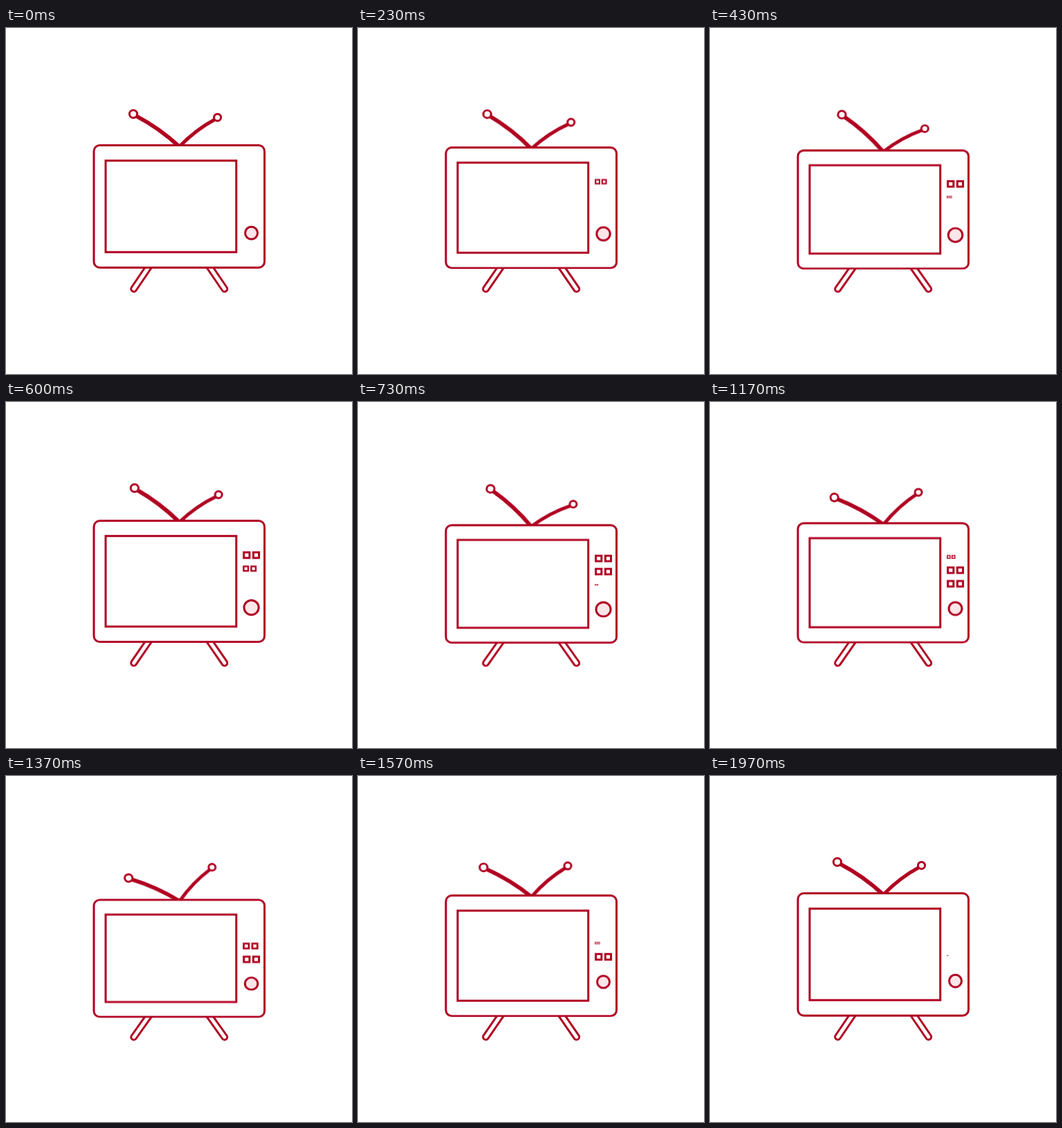
Recreate the animation shown at these times as an HTML page without scripts. Size 500 px wide and 500 px high, loop 2 s.

```html
<!DOCTYPE html>
<html lang="en">
<head>
<meta charset="utf-8">
<title>Television</title>
<style>
html, body { margin: 0; width: 100%; height: 100%; overflow: hidden; background: #fff; }
svg { display: block; width: 100vw; height: 100vh; }

.line { fill: #fff; stroke: #b00020; stroke-width: 3; }
.rod { fill: none; stroke: #b00020; }
.leg { stroke: #b00020; stroke-width: 11; stroke-linecap: round; }
.leg.in { stroke: #fff; stroke-width: 5; }

.tv, .antenna, .row, .knob { animation: 2s -4ms infinite; }
.tv { transform-origin: 250px 383px; animation-name: squash; }
.antenna { transform-origin: 250px 169.5px; animation-name: lean; }
.knob { fill: #fbe6ea; r: 9px; animation-name: swell; }
.row { animation-name: pop; }
.r1 { transform-origin: 342.2px 219.6px; }
.r2 { transform-origin: 342.2px 239.3px; animation-delay: -1670.7ms; }
.r3 { transform-origin: 342.2px 259.4px; animation-delay: -1337.3ms; }

/* six beats of ten ticks: a quick squash, then a linear recovery */
@keyframes squash {
  0%, 100% { transform: scaleY(1); animation-timing-function: step-end; }
  1.6667%, 18.3333%, 35%, 51.6667%, 68.3333%, 85% {
    transform: scaleY(.9555); animation-timing-function: steps(8);
  }
  15%, 31.6667%, 48.3333%, 81.6667% {
    transform: scaleY(.9948); animation-timing-function: step-end;
  }
  65% { transform: scaleY(.992); animation-timing-function: step-end; }
  16.6667%, 33.3333%, 50%, 66.6667%, 83.3333% {
    transform: scaleY(.9766); animation-timing-function: step-end;
  }
  98.3333% { transform: scaleY(1); animation-timing-function: step-end; }
}

/* right while rows arrive, left while they go */
@keyframes lean {
  0%, 50%, 98.3333%, 100% { transform: rotate(0deg); animation-timing-function: step-end; }
  1.6667%, 18.3333%, 35% { transform: rotate(9.7deg); animation-timing-function: steps(8); }
  15%, 31.6667%, 48.3333% { transform: rotate(1.2deg); animation-timing-function: step-end; }
  16.6667%, 33.3333% { transform: rotate(5.2deg); animation-timing-function: step-end; }
  51.6667%, 68.3333%, 85% { transform: rotate(-10deg); animation-timing-function: steps(8); }
  65% { transform: rotate(-1.8deg); animation-timing-function: step-end; }
  81.6667% { transform: rotate(-1.2deg); animation-timing-function: step-end; }
  66.6667%, 83.3333% { transform: rotate(-5.2deg); animation-timing-function: step-end; }
}

@keyframes pop {
  0% { transform: scale(0); animation-timing-function: steps(10); }
  16.6667% { transform: scale(1); }
  50% { transform: scale(1); animation-timing-function: steps(10); }
  66.6667%, 100% { transform: scale(0); }
}

@keyframes swell {
  0%, 78%, 100% { r: 9px; animation-timing-function: linear; }
  21.6667% { r: 10.3px; animation-timing-function: linear; }
  34% { r: 10.7px; animation-timing-function: linear; }
  48.3333% { r: 10.1px; animation-timing-function: linear; }
  58.3333% { r: 9.5px; animation-timing-function: linear; }
}
</style>
</head>
<body>
<svg viewBox="0 0 500 500">
  <defs>
    <g id="pair" class="line">
      <rect x="343.7" y="-4.1" width="8.2" height="8.2"/>
      <rect x="357.4" y="-4.1" width="8.2" height="8.2"/>
    </g>
  </defs>
  <g class="tv">
    <path class="leg" d="M209.8 340L184.7 377M290.6 340L315.8 377"/>
    <path class="leg in" d="M209.8 340L184.7 377M290.6 340L315.8 377"/>
    <g class="antenna">
      <path class="rod" stroke-width="5.8" d="M187 126.500Q222 145 250 171"/>
      <path class="rod" stroke-width="5" d="M303 131.500Q274 147 251 171"/>
      <circle class="line" cx="184" cy="124.300" r="5.6"/>
      <circle class="line" cx="305.6" cy="129.200" r="5"/>
    </g>
    <rect class="line" x="127" y="169.500" width="246.600" height="176.800" rx="8.500"/>
    <rect class="line" x="144" y="191.700" width="188.800" height="132.200"/>
    <g class="row r1"><use href="#pair" y="219.6"/></g>
    <g class="row r2"><use href="#pair" y="239.3"/></g>
    <g class="row r3"><use href="#pair" y="259.4"/></g>
    <circle class="line knob" cx="354.600" cy="296.200" r="9"/>
  </g>
</svg>
</body>
</html>
```
